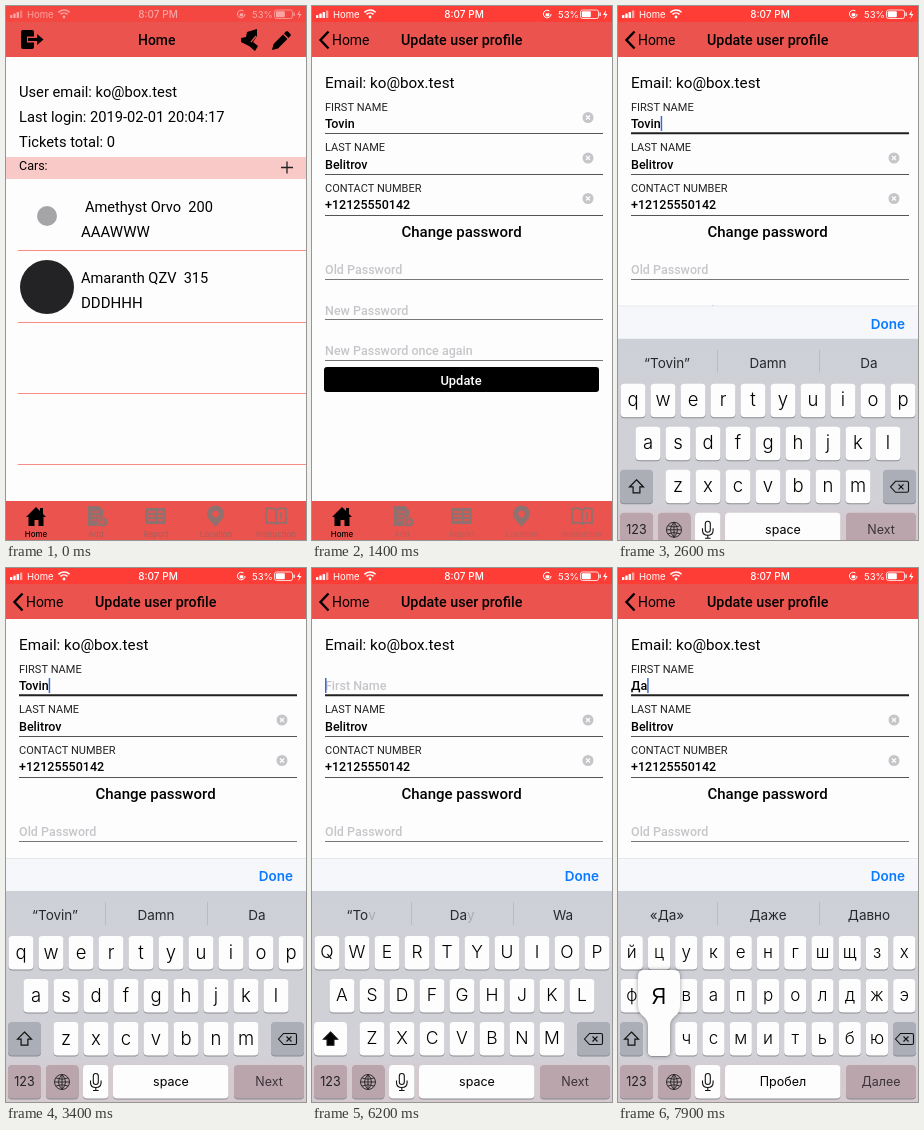
Recreate the animation shown at these times as an HTML page with a canvas. Size 300x534 px, loop 8000 ms.

```html
<!DOCTYPE html>
<html lang="en">
<head>
<meta charset="utf-8">
<title>Profile form</title>
<style>
  html, body { margin: 0; width: 100%; height: 100%; overflow: hidden; background: #fff; }
  canvas { display: block; width: 300px; height: 534px; }
</style>
</head>
<body>
<canvas id="stage"></canvas>
<script>
const W = 300, H = 534, LOOP = 8000;
const PUSH_AT = 800, FOCUS_AT = 2340, RUSSIAN_AT = 7100;
const RED = '#ea534e', INACTIVE = '#8f716f', DIN = 'Roboto', SYSTEM = 'Inter';
const canvas = document.getElementById('stage');
const c = canvas.getContext('2d');
const scale = window.devicePixelRatio || 1;
canvas.width = W * scale;
canvas.height = H * scale;

const clamp = v => Math.max(0, Math.min(1, v));
// Critically damped spring, as used by the page push and the keyboard
const spring = ms => { const k = Math.max(0, ms) * .0192; return 1 - (1 + k) * Math.exp(-k); };
const latest = (steps, t) => steps.filter(s => s[0] <= t).pop()[1];

const firstName = [
  [0, 'Tovin'], [5300, 'Tovi'], [5500, 'Tov'], [5700, 'To'], [5900, 'T'], [6100, ''],
  [7400, 'Д'], [7700, 'Да']
];
// Letters after a bar are still fading out
const suggestions = [
  [0, ['“Tovin”', 'Damn', 'Da']], [5400, ['“Tovi”', 'Day', 'Das']],
  [5600, ['“Tov”', 'Day', 'Was']], [6150, ['“To|v', 'Da|y', 'Wa']],
  [6300, ['I', 'The', 'I’m']], [RUSSIAN_AT, ['Я', 'Не', 'А']],
  [7450, ['«Д»', 'Да', 'Для']], [7750, ['«Да»', 'Даже', 'Давно']]
];
const popups = [[0, ''], [7300, 'д'], [7400, ''], [7600, 'а'], [7700, ''], [7850, 'я']];
const layouts = {
  en: { rows: ['qwertyuiop', 'asdfghjkl', 'zxcvbnm'], pitch: 30, size: 18.5, space: 'space', next: 'Next' },
  ru: { rows: ['йцукенгшщзх', 'фывапролджэ', 'ячсмитьбю'], pitch: 27.25, size: 17, space: 'Пробел', next: 'Далее' }
};

// y is the middle of the capital letters
function text(str, x, y, size, { color = '#000', weight = 400, align = 'left', font = DIN } = {}) {
  c.font = `${weight} ${size}px ${font}, sans-serif`;
  c.textAlign = align;
  c.fillStyle = color;
  c.fillText(str, x, y + size * .355);
}
function rect(x, y, w, h, color, r = 0) {
  c.fillStyle = color;
  c.beginPath();
  c.roundRect(x, y, w, h, r);
  c.fill();
}
function circle(x, y, r, color) {
  c.fillStyle = color;
  c.beginPath();
  c.arc(x, y, r, 0, 7);
  c.fill();
}
const fill = (d, color) => { c.fillStyle = color; c.fill(new Path2D(d)); };
function stroke(d, color, width = 1) {
  c.strokeStyle = color;
  c.lineWidth = width;
  c.stroke(new Path2D(d));
}
function group(draw, dx = 0, dy = 0, alpha = 1) {
  c.save();
  c.translate(dx, dy);
  c.globalAlpha = alpha;
  draw();
  c.restore();
}

function homePage() {
  rect(0, 51, W, 444, '#fefdfe');
  text('User email: ko@box.test', 13, 86, 14.7);
  text('Last login: 2019-02-01 20:04:17', 13, 111, 14.7);
  text('Tickets total: 0', 13, 136, 14.7);
  rect(0, 151, W, 22, '#f8c9c6');
  text('Cars:', 13, 160, 12.5);
  stroke('M275 161.5h12M281 155.5v12', '#222', 1.3);
  circle(41, 210, 10, '#a5a5a7');
  text('Amethyst Orvo  200', 79, 201, 14.6);
  text('AAAWWW', 75, 226, 15);
  circle(41, 281, 27, '#232326');
  text('Amaranth QZV  315', 75, 272, 14.6);
  text('DDDHHH', 75, 297, 15);
  for (const y of [244, 316, 387, 458]) rect(12, y, 288, 1, '#f58c86');
}

function clearButton(y) {
  circle(276, y, 5.5, '#c6c6ca');
  stroke(`M274 ${y - 2}l4 4m0 -4l-4 4`, '#fff', 1.1);
}
function field(label, value, y) {
  text(label, 13, y, 11, { color: '#222' });
  text(value, 13, y + 17, 12.5, { weight: 500 });
  rect(13, Math.round(y + 26.5), 278, 1, '#555');
  clearButton(y + 10.5);
}
function profilePage(t) {
  rect(0, 51, W, 444, '#fefdfe');
  text('Email: ko@box.test', 13, 77, 15.2);

  const name = latest(firstName, t), focused = t >= FOCUS_AT;
  const hint = { color: '#c6c6ca', weight: 500 };
  const label = t < 7400 ? clamp((6200 - t) / 150) : clamp((t - 7400) / 200);
  group(() => text('FIRST NAME', 13, 101, 11, { color: '#222' }), 0, (1 - label) * 8, label);
  text(name || 'First Name', 13, 118, 12.5, name ? { weight: 500 } : hint);
  rect(13, focused ? 126.3 : 127, 278, focused ? 2 : 1, focused ? '#222' : '#555');
  if (!focused) clearButton(111.5);
  const blinkOn = t < 5300 ? Math.floor((t - 2400) / 500) % 2 === 0 : t < 6600 || t >= 7000;
  if (focused && blinkOn) {
    c.font = `500 12.5px ${DIN}, sans-serif`;
    rect(13 + c.measureText(name).width, 110, 1.5, 15, '#3a6bd0');
  }

  field('LAST NAME', 'Belitrov', 141.5);
  field('CONTACT NUMBER', '+12125550142', 182);
  text('Change password', 149.5, 225.5, 15, { weight: 500, align: 'center' });
  ['Old Password', 'New Password', 'New Password once again'].forEach((str, i) => {
    text(str, 13, 264 + i * 40.3, 12.5, hint);
    rect(13, Math.round(273 + i * 40.4), 278, 1, '#777');
  });
  rect(12, 361, 275, 25, '#000', 3);
  text('Update', 149, 374, 12.9, { color: '#fff', weight: 500, align: 'center' });
}

function statusBar(alpha) {
  const white = { color: '#fff', font: SYSTEM };
  group(() => {
    rect(0, 0, W, 16, '#ff3d37');
    [3, 4.5, 6, 7.5].forEach((h, i) => rect(4 + i * 3.3, 12 - h, 2.4, h, i < 3 ? '#fff' : '#fff8', .5));
    text('Home', 21, 8.5, 9.5, white);
    for (const r of [8, 5]) {
      c.beginPath();
      c.arc(58, 12, r, -2.35, -.8);
      c.strokeStyle = '#fff';
      c.lineWidth = 1.6;
      c.stroke();
    }
    circle(58, 11, 1.4, '#fff');
    text('8:07 PM', 152, 8.5, 10, { ...white, weight: 500, align: 'center' });
    stroke('M239 8a3.8 3.8 0 1 1 -1.5 -3', '#fff', 1);
    rect(233.7, 7.3, 3.6, 3, '#fff');
    text('53%', 246, 8.5, 9.6, white);
    c.strokeStyle = '#fff';
    c.lineWidth = .8;
    c.beginPath();
    c.roundRect(268.5, 4, 18, 8.5, 2);
    c.stroke();
    rect(269.8, 5.3, 9, 5.9, '#fff', 1);
    rect(287.5, 6.5, 1.2, 3.5, '#fff');
    fill('M294 4l-3 5h2.3l-1 4 3.2 -5h-2.2z', '#fff');
  }, 0, 0, alpha);
}

function navBar(t, p) {
  rect(0, 0, W, 51, RED);
  statusBar(t < 100 ? .5 : 1);
  const oldAlpha = 1 - p * p;
  group(() => {
    rect(15, 24, 13, 19, '#000', 2);
    stroke('M21 33.5h14', RED, 6);
    stroke('M22 33.5h12', '#000', 3);
    fill('M31 28l6.5 5.5 -6.5 5.5z', '#000');
  }, 0, 0, oldAlpha);
  group(() => {
    fill('M241 26l10 -3 0 7 -4 6 5 4 -3 5 -6 -5 -8 -4 0 -4 5 -1z', '#000');
    stroke('M250 30l-5 6', RED, 1.2);
  }, 0, 0, oldAlpha);
  group(() => {
    fill('M266 44l1.6 -6 9.4 -9.4 4.4 4.4 -9.4 9.4z', '#000');
    fill('M278 27.6l2 -2q1 -1 2 0l2.4 2.4q1 1 0 2l-2 2z', '#000');
  }, 0, 0, oldAlpha * (t >= 700 ? .6 : 1));

  group(() => stroke('M16.5 25.5l-8 8.5 8 8.5', '#000', 2.4), 0, 0, p);
  text('Home', 20 + 112 * (1 - p), 34, 13.9, { weight: p < .5 ? 500 : 400 });
  if (p > 0) text('Update user profile', 89 + 211 * (1 - p), 34, 14.3, { weight: 500 });
}

function tabBar(t) {
  rect(0, 495, W, 39, RED);
  fill('M20 511l10 -10 4 4v-3h3v6l3 3h-2.5v9h-15v-9z', '#000');
  rect(28.5, 514, 4, 6, RED);
  fill('M82 500h11l4 4v9h-3v7h-12z', INACTIVE);
  stroke('M85 506h8M85 510h8M85 514h6', RED, 1.2);
  circle(97, 516, 5.4, RED);
  circle(97, 516, 4.6, INACTIVE);
  stroke('M94 516h6M97 513v6', RED, 1.2);
  rect(139, 502, 21, 16, INACTIVE, 2);
  stroke('M142 506h7M142 510h7M142 514h7M152 506h5M152 510h5M152 514h5', RED, 1.6);
  fill('M201 508a8.5 8.5 0 0 1 17 0c0 5 -5 8 -8.5 13c-3.5 -5 -8.5 -8 -8.5 -13z', INACTIVE);
  circle(209.5, 508, 3.2, RED);
  stroke('M260 503q6 -2 10 1q4 -3 10 -1v14q-6 -1 -10 1q-4 -2 -10 -1zM270 504v14M275 506v7', INACTIVE, 1.8);
  ['Home', 'Add', 'Report', 'Location', 'Instruction'].forEach((name, i) =>
    text(name, 30 + i * 60, 528, 8, {
      color: i ? (t < 100 ? '#a0615d' : '#b55f5b') : '#000', weight: i ? 400 : 500, align: 'center', font: SYSTEM
    }));
}

function key(x, y, w, color = '#fdfdfe') {
  rect(x, y + 1, w, 33.5, '#898b91', 4);
  rect(x, y, w, 33.5, color, 4);
}
function popup(letter, x, y, size) {
  c.save();
  c.shadowColor = '#0006';
  c.shadowBlur = 4 * scale;
  fill(`M${x - 15} ${y - 52}h30q6 0 6 6v30q0 6 -5 10q-5 4 -5 10v26q0 4 -4 4h-14q-4 0 -4 -4v-26
    q0 -6 -5 -10q-5 -4 -5 -10v-30q0 -6 6 -6z`, '#fdfdfe');
  c.restore();
  text(letter, x, y - 28, size * 1.65, { align: 'center', font: SYSTEM, weight: 300 });
}
function suggestion(str, x) {
  const [solid, fading = ''] = str.split('|');
  c.font = `400 13.5px ${SYSTEM}, sans-serif`;
  const left = x - c.measureText(solid + fading).width / 2;
  const solidWidth = c.measureText(solid).width;
  text(solid, left, 347, 13.5, { color: '#26282c', font: SYSTEM });
  text(fading, left + solidWidth, 347, 13.5, { color: '#a9acb2', font: SYSTEM });
}

function keyboard(t) {
  const mid = { align: 'center', font: SYSTEM };
  const lang = t >= RUSSIAN_AT ? 'ru' : 'en', { rows, pitch, size, space, next } = layouts[lang];
  const caps = latest(firstName, t) === '';
  const deleting = firstName.some(([at]) => at >= 5300 && at <= 6100 && t >= at - 50 && t < at + 50);
  const side = '#abadb7', bottom = '#baa5ad', pressed = '#fdfdfe';

  rect(0, 290, W, 33, '#f6f7fa');
  rect(0, 290, W, .6, '#d5d7db');
  text('Done', 287, 308.5, 13.5, { color: '#0a7aff', weight: 600, align: 'right', font: SYSTEM });
  const back = c.createLinearGradient(0, 323, 0, 534);
  back.addColorStop(0, '#cdd0d6');
  back.addColorStop(.78, '#d1d1d7');
  back.addColorStop(.86, '#d5cad0');
  rect(0, 323, W, 211, back);
  latest(suggestions, t).forEach((s, i) => suggestion(s, 49 + i * 101));
  rect(99, 334, .8, 23, '#b4b7be');
  rect(201, 334, .8, 23, '#b4b7be');

  const active = latest(popups, t);
  let bubble = null;
  rows.forEach((row, r) => [...row].forEach((letter, i) => {
    const x = 150 + (i - (row.length - 1) / 2) * pitch, y = 368 + r * 43;
    const shown = caps ? letter.toUpperCase() : letter;
    key(x - pitch / 2 + 2.5, y, pitch - 5);
    text(shown, x, y + 16, caps ? size - 1 : size, { ...mid, weight: 300 });
    if (letter === active) bubble = [shown, x, y, caps ? size - 3 : size];
  }));

  const sideW = lang === 'en' ? 33 : 23, shiftX = 2 + sideW / 2, delX = W - shiftX;
  key(2, 454, sideW, caps ? pressed : side);
  const arrow = `M${shiftX} 464l7 7.2h-3.6v6h-6.8v-6h-3.6z`;
  if (caps) fill(arrow, '#000');
  stroke(arrow, '#111', 1.2);
  key(W - 2 - sideW, 454, sideW, deleting ? pressed : side);
  stroke(`M${delX - 9} 471l5 -5.5h11.5q1.5 0 1.5 1.5v8q0 1.5 -1.5 1.5h-11.5z
    M${delX - 1} 468.5l5 5m0 -5l-5 5`, '#111', 1.1);

  key(2, 497, 33, bottom);
  text('123', 18.5, 514, 12.5, { ...mid, color: '#222' });
  key(40, 497, 32.5, t >= 7000 && t < RUSSIAN_AT ? pressed : bottom);
  stroke(`M48.5 514a7.5 7.5 0 1 0 15 0a7.5 7.5 0 1 0 -15 0zM56 506.5v15M48.5 514h15
    M56 506.5q-7 7.5 0 15q7 -7.5 0 -15M50 510q6 2.5 12 0M50 518q6 -2.5 12 0`, '#222', .9);
  key(77, 497, 25.5);
  c.strokeStyle = '#111';
  c.lineWidth = 1.1;
  c.beginPath();
  c.roundRect(87.3, 505.5, 5, 11, 2.5);
  c.stroke();
  stroke('M84.5 512.5v2q0 5 5.3 5t5.3 -5v-2M89.8 519.5v3M87 522.5h5.6', '#111', 1.1);
  key(107, 497, 115.5);
  text(lang === 'ru' && t < 7600 ? 'Русский' : space, 165, 514, 12.5, mid);
  key(228, 497, 70, bottom);
  text(next, 263, 514, 12.5, { ...mid, color: '#3b3338' });
  if (bubble) popup(...bubble);
}

function draw(t) {
  c.setTransform(scale, 0, 0, scale, 0, 0);
  const raw = spring(t - PUSH_AT), p = raw > .999 ? 1 : raw;
  if (p < 1) group(homePage, -90 * p);
  if (p > 0) {
    rect(0, 51, W, 444, `rgba(0,0,0,${.1 * p})`);
    if (p < 1) rect(300 * (1 - p) - 2, 51, 2, 444, 'rgba(0,0,0,.06)');
    group(() => profilePage(t), 300 * (1 - p));
  }
  navBar(t, p);
  tabBar(t);
  if (t >= FOCUS_AT) group(() => keyboard(t), 0, 244 * (1 - spring(t - FOCUS_AT)));
}

const start = performance.now();
function tick() {
  draw((performance.now() - start) % LOOP);
  requestAnimationFrame(tick);
}
tick();
</script>
</body>
</html>
```
